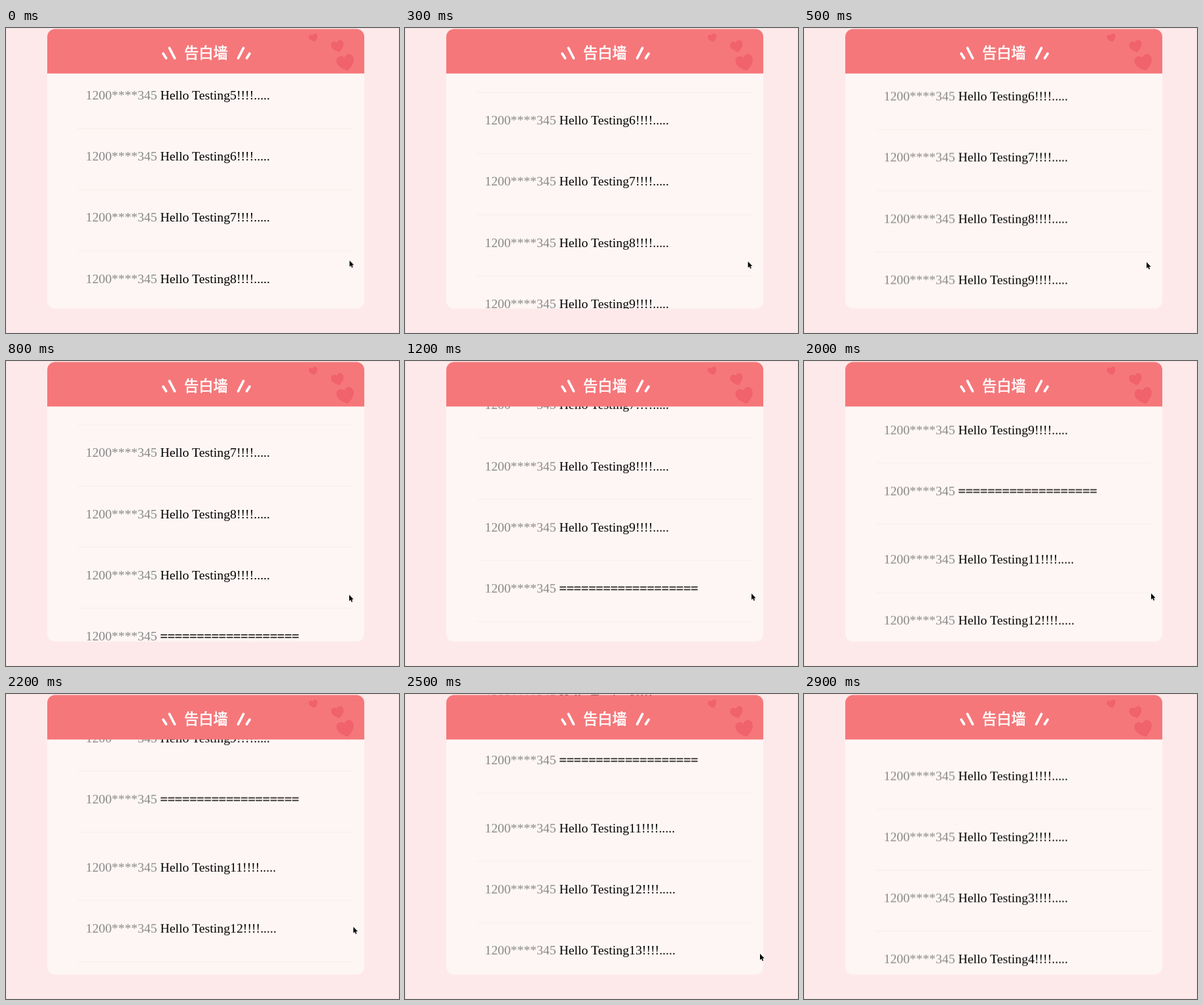
An HTML page for the animation above (3 s loop, 600 by 465 pixels).

```html
<!DOCTYPE html>
<html lang="zh-CN">
<head>
<meta charset="utf-8">
<title>告白墙</title>
<style>
  html, body { margin: 0; width: 100%; height: 100%; overflow: hidden; background: #fee9ea; }
  svg { display: block; width: 600px; height: 465px; }
  .row { font: 19.8px "Liberation Serif", "Times New Roman", serif; white-space: pre; }
  .row .phone { fill: #888; }
  .row .rule { stroke: #000; stroke-width: .5; }
  .row line { stroke: #f6edeb; }
  .title { font: 22.3px "Noto Sans CJK SC", "Noto Sans CJK", sans-serif; fill: #fff; stroke: #fff; stroke-width: .6; }
  .marks { stroke: #fff; stroke-width: 3.8; stroke-linecap: round; }
  .hearts { fill: #f0626c; }
  #list { animation: scroll 3s infinite; }
  #cursor { animation: move 3s infinite; }

  /* The list moves ten times a second, then jumps back to its top. */
  @keyframes scroll {
    0%     { transform: translateY(-263.2px); animation-timing-function: steps(5); }
    16.66% { transform: translateY(-354.8px); animation-timing-function: steps(3); }
    26.66% { transform: translateY(-412.2px); animation-timing-function: steps(4); }
    40%    { transform: translateY(-485.1px); animation-timing-function: steps(5); }
    56.66% { transform: translateY(-576.6px); animation-timing-function: steps(5); }
    73.33% { transform: translateY(-671.4px); animation-timing-function: steps(7); }
    96.65% { transform: translateY(-810.7px); animation-timing-function: step-end; }
    96.66%, 100% { transform: translateY(131.2px); animation-timing-function: step-end; }
  }
  @keyframes move {
    0%     { transform: translate(524.5px, 354.5px); animation-timing-function: steps(5); }
    16.66% { transform: translate(523px, 357px); animation-timing-function: steps(3); }
    26.66% { transform: translate(524px, 356.5px); animation-timing-function: steps(4); }
    40%    { transform: translate(529px, 354.5px); animation-timing-function: steps(5); }
    56.66% { transform: translate(529.5px, 353px); animation-timing-function: steps(5); }
    73.33% { transform: translate(530.3px, 355px); animation-timing-function: steps(2); }
    80%    { transform: translate(534px, 362px); animation-timing-function: steps(2); }
    86.66% { transform: translate(550px, 430px); opacity: 1; animation-timing-function: step-end; }
    90%, 100% { transform: translate(550px, 430px); opacity: 0; animation-timing-function: step-end; }
  }
</style>
</head>
<body>
<svg viewBox="0 0 600 465">
  <defs>
    <clipPath id="card"><rect x="63" y="1.5" width="484" height="426.3" rx="12"/></clipPath>
    <path id="heart" d="M0 .95C-.55 .6-1 .2-1-.3C-1-.95-.3-1.05 0-.6C.3-1.05 1-.95 1-.3C1 .2 .55 .6 0 .95Z"/>
  </defs>
  <rect x=".5" y=".5" width="599" height="464" fill="#fee9ea" stroke="#f2e1e2"/>
  <g clip-path="url(#card)">
    <rect x="63" y="1" width="484" height="427" fill="#fdf6f4"/>
    <g id="list"></g>
    <rect x="63" y="1" width="484" height="68.4" fill="#f5777a"/>
    <g class="hearts">
      <use href="#heart" transform="translate(469.3 15) rotate(-15) scale(6.6)"/>
      <use href="#heart" transform="translate(506.6 28) rotate(-15) scale(9.6)"/>
      <use href="#heart" transform="translate(518.7 52.8) rotate(-15) scale(13.2)"/>
    </g>
    <path class="marks" d="M240 39L244.5 46M249.5 30.5L257.5 46M362.5 30.5L354.500 46M372 39L367.5 46"/>
    <text class="title" x="272" y="46">告白墙</text>
  </g>
  <path id="cursor" d="M0 0V9.500L2.200 7.500L3.600 11L5.200 10.300L3.800 7H6.700Z"
        stroke="#fff" stroke-width="1.200" paint-order="stroke"/>
</svg>
<script>
  const PITCH = 93.1, PAGE_GAP = 11;
  const phone = "1200****345";

  const row = n => {
    const y = (n - 1) * PITCH + (n > 10 ? PAGE_GAP : 0);
    const message = n === 10
      ? `<tspan class="rule">${"=".repeat(19)}</tspan>`
      : `Hello Testing${n}!!!!.....`;
    return `<g class="row" transform="translate(0 ${y})">
      <text x="121.8"><tspan class="phone">${phone}</tspan> ${message}</text>
      <line x1="109" x2="530" y1="44.4" y2="44.4"/>
    </g>`;
  };

  document.getElementById("list").innerHTML =
    Array.from({ length: 15 }, (_, i) => row(i + 1)).join("");
</script>
</body>
</html>
```
